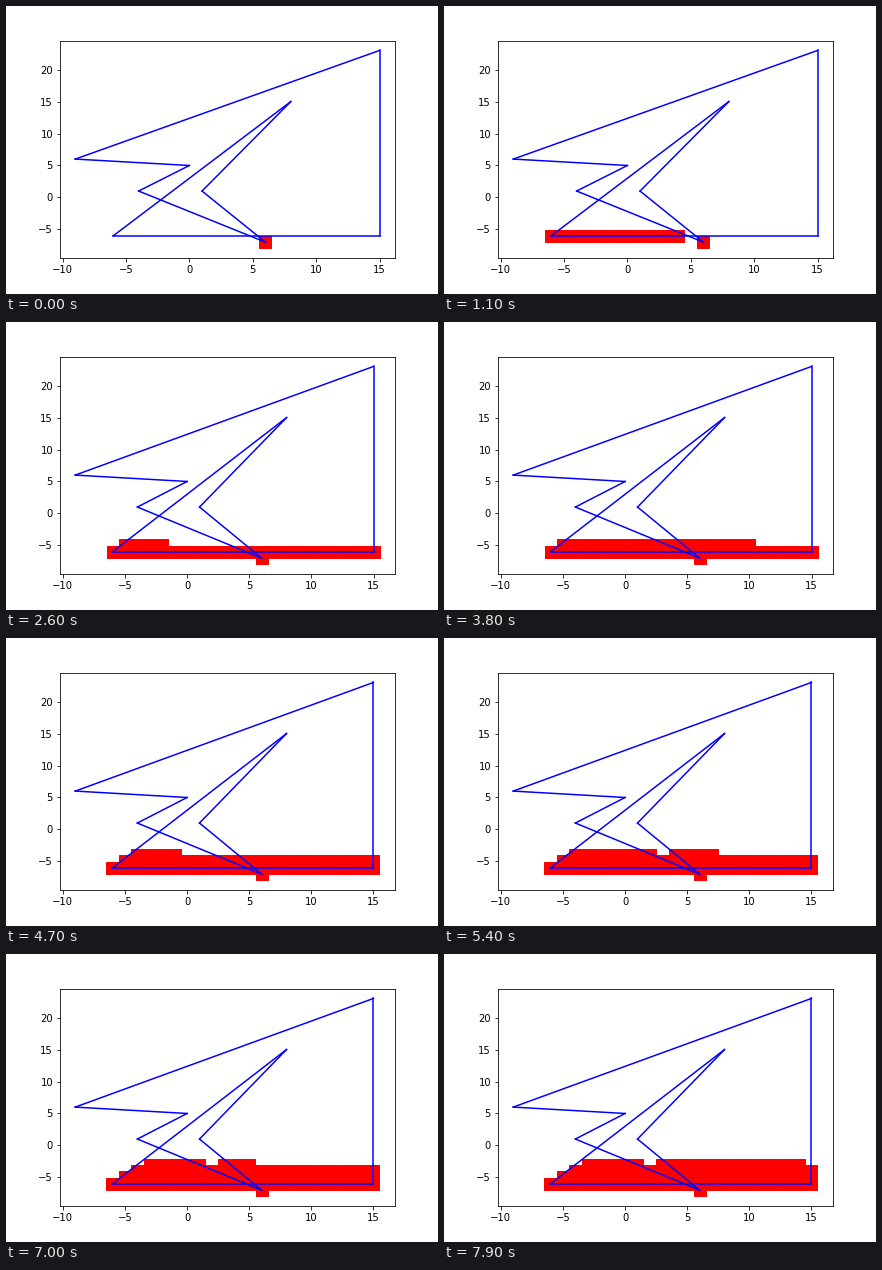
Animation of 432 by 288 pixels, one loop 8000 ms. Source, as a matplotlib script:

```python
from itertools import count, islice

import matplotlib.pyplot as plt
from matplotlib.animation import FuncAnimation

W, H, DPI = 432, 288, 72
FRAMES, STEP = 80, 100
LEFT, RIGHT, BOTTOM, TOP = 0.125, 0.9, 0.125, 0.88
AREA = 150               # marker area in square points
HALF = AREA ** 0.5 / 2   # half a marker, in pixels at 72 dpi
MARGIN = 0.05
DRIFT = 1e-9             # keeps truncation of whole crossings predictable

VERTICES = [(15, 23), (-9, 6), (0, 5), (-4, 1), (6, -7),
            (1, 1), (8, 15), (-6, -6), (15, -6)]
EDGES = list(zip(VERTICES, VERTICES[1:] + VERTICES[:1]))

xs, ys = zip(*VERTICES)
X0, X1, Y0, Y1 = min(xs), max(xs), min(ys), max(ys)


def crossings(y):
    """Sorted, truncated x positions where the scanline meets the polygon."""
    hits = []
    for edge in EDGES:
        (xa, ya), (xb, yb) = sorted(edge, key=lambda p: p[1])
        if ya <= y < yb:
            slope = (xb - xa) / (yb - ya)
            hits.append(xa + (y - ya) * (slope + DRIFT))
    return [int(x) for x in sorted(hits)]


def scan():
    """Cells of the fill, row by row from the bottom, left to right."""
    for y in count(Y0):
        hits = crossings(y)
        for a, b in zip(hits[::2], hits[1::2]):
            for x in range(a, b + 1):
                yield x, y


def padded(lo, hi):
    pad = MARGIN * (hi - lo)
    return lo - pad, hi + pad


def half_cell(lo, hi, pixels):
    """Half a marker in data units on an axis showing the padded range."""
    a, b = padded(lo, hi)
    return HALF * (b - a) / pixels


def x_limits(cells):
    """Each marker on the right edge widens the range by its own half size."""
    hi = X1
    for x, _ in cells:
        if x == X1:
            hi = X1 + half_cell(X0, hi, W * (RIGHT - LEFT))
    return padded(X0, hi)


cells = list(islice(scan(), FRAMES))

fig, ax = plt.subplots(figsize=(W / DPI, H / DPI), dpi=DPI)
fig.subplots_adjust(left=LEFT, right=RIGHT, bottom=BOTTOM, top=TOP)

for p, q in EDGES:
    ax.plot(*zip(p, q), 'b')
fill = ax.scatter([], [], s=AREA, c='r', marker='s')
ax.set_ylim(padded(Y0 - half_cell(Y0, Y1, H * (TOP - BOTTOM)), Y1))


def update(i):
    shown = cells[:i + 1]
    fill.set_offsets(shown)
    ax.set_xlim(x_limits(shown))
    return fill,


anim = FuncAnimation(fig, update, frames=FRAMES, interval=STEP,
                     repeat=True, repeat_delay=0, blit=False)
plt.show()
```
